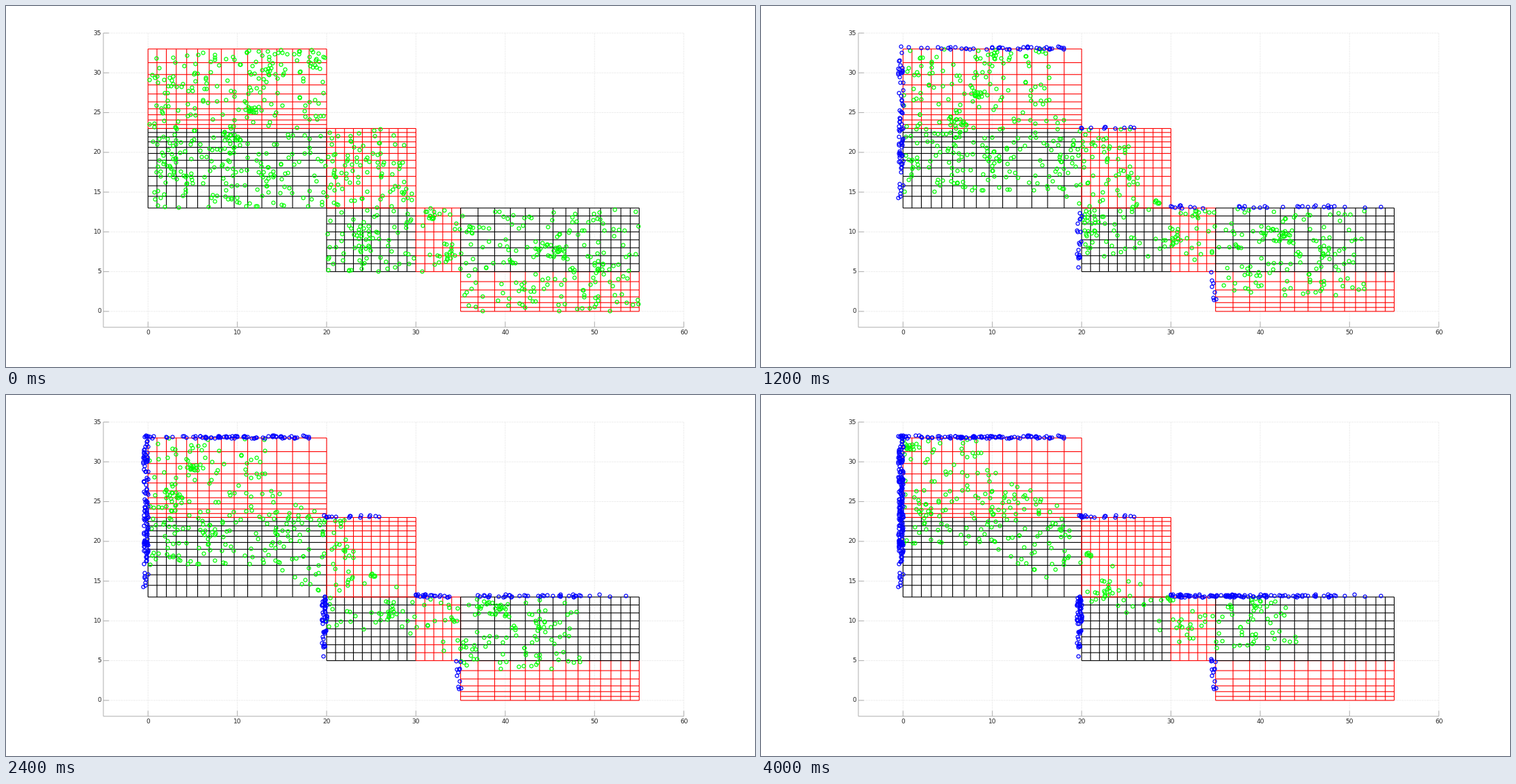
A matplotlib script that plays this animation: 1077x520 px, repeating every 4200 ms.

```python
import numpy as np
import matplotlib.pyplot as plt
from matplotlib.animation import FuncAnimation
from matplotlib.collections import LineCollection

W, H, DPI = 1077, 520, 64
PX = 72 / DPI                       # points per pixel
FRAMES, INTERVAL = 21, 200
STEP = np.array([-0.546, 0.327])    # drift per frame
SUB = 8                             # wall checks per frame

RED, BLACK, GREEN, BLUE = "#ff0000", "#000000", "#00ff00", "#0000ff"
AXIS, GRID, TEXT = "#b0b0b0", "#ececec", "#262626"


def graded(start, end, n, ratio=1.0):
    """n cells from start to end, each one ratio times the previous."""
    widths = ratio ** np.arange(n)
    edges = np.concatenate([[0], np.cumsum(widths)]) / widths.sum()
    return start + (end - start) * edges


x_left = graded(0, 20, 14, 1.053)
x_mid = graded(20, 30, 10)
x_link = graded(30, 35, 5)
x_right = graded(55, 35, 14, 1.053)
y_top = graded(23, 33, 10, 1.147)
y_upper = graded(23, 13, 11, 1.114)
y_lower = graded(5, 13, 8)
y_base = graded(0, 5, 6, 1.2025)

# x edges, y edges, colour, evenly scattered particles
BLOCKS = [
    (x_left, y_upper, BLACK, 135),
    (x_mid, y_lower, BLACK, 65),
    (x_left, y_top, RED, 140),
    (x_mid, y_upper, RED, 85),
    (x_link, y_lower, RED, 22),
    (x_right, y_base, RED, 70),
    (x_right, y_lower, BLACK, 95),
]

# centre x, centre y, spread x, spread y, count
CLUMPS = [
    (11.6, 25.5, 0.6, 0.3, 15),
    (9.2, 21.6, 0.6, 1.2, 24),
    (13.6, 30.6, 0.8, 0.9, 17),
    (18.3, 31.7, 0.8, 0.9, 14),
    (2.0, 29.0, 0.6, 0.5, 8),
    (13.2, 17.6, 0.5, 1.0, 12),
    (2.5, 19.6, 0.9, 1.2, 14),
    (4.4, 16.5, 0.4, 1.0, 10),
    (9.0, 16.6, 0.6, 0.8, 8),
    (28.4, 14.6, 0.8, 0.6, 8),
    (24.4, 9.0, 0.7, 0.8, 12),
    (31.8, 11.6, 0.4, 0.3, 5),
    (33.8, 7.0, 0.7, 0.6, 12),
    (36.2, 10.2, 0.5, 0.4, 6),
    (45.6, 8.0, 1.2, 0.9, 24),
    (51.2, 5.0, 0.7, 0.7, 9),
]


def inside(p):
    x, y = p[..., 0], p[..., 1]
    hit = np.zeros(x.shape, bool)
    for bx, by, _, _ in BLOCKS:
        hit |= ((x >= bx.min()) & (x <= bx.max())
                & (y >= by.min()) & (y <= by.max()))
    return hit


def scatter(rng):
    parts = [rng.uniform((bx.min(), by.min()), (bx.max(), by.max()), (n, 2))
             for bx, by, _, n in BLOCKS]
    parts += [rng.normal((cx, cy), (sx, sy), (n, 2))
              for cx, cy, sx, sy, n in CLUMPS]
    pts = np.vstack(parts)
    return pts[inside(pts)]


def stop_frames(pts):
    """Frame at which each particle has crossed a wall and sticks."""
    times = np.arange(1, FRAMES * SUB + 1) / SUB
    out = ~inside(pts[:, None] + times[None, :, None] * STEP)
    first = np.where(out.any(axis=1), out.argmax(axis=1), FRAMES * SUB * 2)
    return first // SUB + 1


def draw_lines(ax, segments, color, width, z, **kw):
    lines = LineCollection(segments, colors=color, linewidths=width * PX,
                           zorder=z, snap=False, clip_on=False, **kw)
    ax.add_collection(lines, autolim=False)


def draw_mesh(ax):
    for i, (bx, by, color, _) in enumerate(BLOCKS):
        segs = [[(x, by.min()), (x, by.max())] for x in bx]
        segs += [[(bx.min(), y), (bx.max(), y)] for y in by]
        draw_lines(ax, segs, color, 1.1, 3 + i * 0.1)


def draw_axes(ax):
    x0, x1, y0, y1 = -5, 60, -2, 35
    ax.set(xlim=(x0, x1), ylim=(y0, y1))
    ax.axis("off")
    xs, ys = range(0, 61, 10), range(0, 36, 5)
    ux = (x1 - x0) / (0.775 * W)
    uy = (y1 - y0) / (0.815 * H)

    grid = [[(x, y0), (x, y1)] for x in xs] + [[(x0, y), (x1, y)] for y in ys]
    draw_lines(ax, grid, GRID, 0.9, 1, linestyles=[(0, (3, 1))])

    frame = [[(x0, y0), (x1, y0)], [(x0, y0), (x0, y1)]]
    frame += [[(x, y0), (x, y0 + 8 * uy)] for x in xs]
    frame += [[(x0, y), (x0 + 8 * ux, y)] for y in ys]
    draw_lines(ax, frame, AXIS, 1, 2)

    font = dict(family="DejaVu Sans", size=9 * PX, color=TEXT)
    for x in xs:
        ax.text(x, y0 - 8 * uy, str(x), ha="center", va="center", **font)
    for y in ys:
        ax.text(x0 - 3 * ux, y, str(y), ha="right", va="center", **font)


fig = plt.figure(figsize=(W / DPI, H / DPI), dpi=DPI, facecolor="white")
ax = fig.add_axes([0.13, 0.11, 0.775, 0.815])
draw_axes(ax)
draw_mesh(ax)

start = scatter(np.random.default_rng(11))
stops = stop_frames(start)


def rings(color, z):
    return ax.plot([], [], "o", ms=5 * PX, mfc="none", mec=color,
                   mew=1.2 * PX, zorder=z, clip_on=False)[0]


moving, stuck = rings(GREEN, 5), rings(BLUE, 6)


def update(k):
    pos = start + np.minimum(k, stops)[:, None] * STEP
    done = stops <= k
    moving.set_data(pos[~done].T)
    stuck.set_data(pos[done].T)
    return moving, stuck


anim = FuncAnimation(fig, update, frames=FRAMES, interval=INTERVAL,
                     init_func=lambda: update(0), repeat=True)
plt.show()
```
